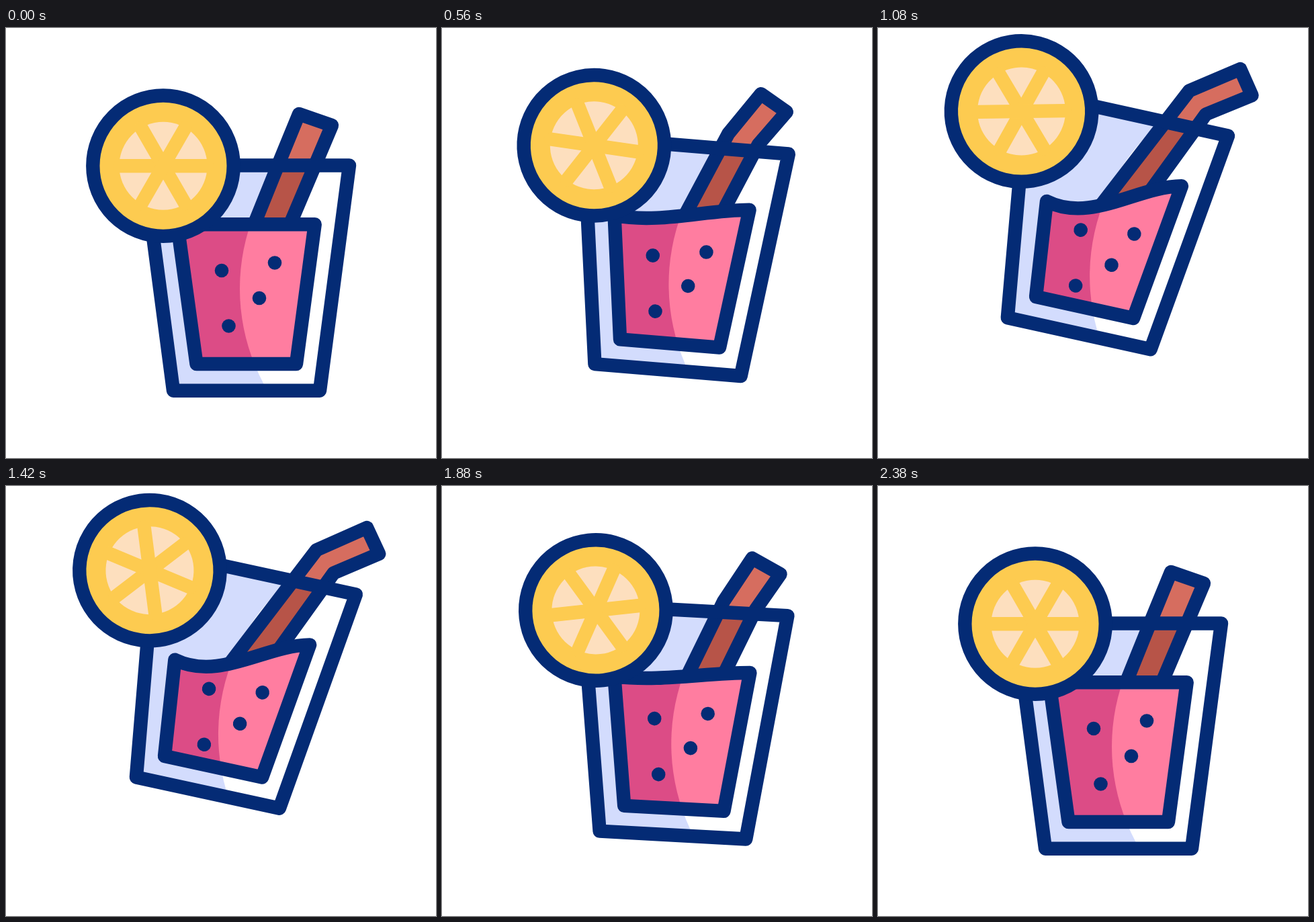
An HTML page with a canvas that plays this animation: 640x640 px, repeating every 2400 ms.

```html
<!DOCTYPE html>
<html lang="en">
<head>
<meta charset="utf-8">
<title>Swaying drink</title>
<style>
  html, body { margin: 0; height: 100%; overflow: hidden; background: #fff; }
  canvas { display: block; }
</style>
</head>
<body>
<canvas id="stage" width="640" height="640"></canvas>
<script>
const ctx = document.getElementById('stage').getContext('2d');
const NAVY = '#042b75', LINE = 20.4, LOOP = 2400, PEAK = 1200, END = 2380;

// Cubic bezier easing (0.76, 0, 0.24, 1), solved by bisection.
function ease(x) {
  if (x <= 0) return 0;
  if (x >= 1) return 1;
  let low = 0, high = 1;
  for (let i = 0; i < 30; i++) {
    const s = (low + high) / 2;
    if (2.28 * s - 3.84 * s * s + 2.56 * s ** 3 < x) low = s; else high = s;
  }
  return low * low * (3 - 2 * low);
}

function polygon(points) {
  const path = new Path2D();
  points.forEach(([x, y]) => path.lineTo(x, y));
  path.closePath();
  return path;
}

function disc(x, y, r) {
  const path = new Path2D();
  path.arc(x, y, r, 0, 2 * Math.PI);
  return path;
}

function fill(path, color) {
  ctx.fillStyle = color;
  ctx.fill(path);
}

function outline(path, color = NAVY) {
  ctx.strokeStyle = color;
  ctx.stroke(path);
}

// Fills a shape, then paints the overlap with a second shape.
function fillOverlap(shape, color, overlap, overlapColor) {
  fill(shape, color);
  ctx.save();
  ctx.clip(shape);
  fill(overlap, overlapColor);
  ctx.restore();
}

const glass = polygon([[205, 204.5], [511, 204.5], [467, 539.7], [249, 539.7]]);
const shine = disc(648, 388, 300);
const bubbles = [[321, 361], [400, 349.5], [377, 402], [331.5, 443.5]];

function drawDrink(p) {
  const angle = 12.55 * Math.PI / 180 * p;
  const at = (x, y, dx, dy) => [x + dx * p, y + dy * p];

  ctx.save();
  ctx.translate(320 - 10.5 * p, 320 - 88.5 * p);
  ctx.rotate(angle);
  ctx.translate(-320, -320);

  fillOverlap(glass, '#d3dcfd', shine, '#fff');

  const straw = polygon([
    [342, 360], at(406.5, 200, 34, -49), at(436, 128, 71.7, -24.7),
    at(485, 145, 48, -7), at(460.5, 203, 11.5, -23), [394, 360]
  ]);
  fill(straw, '#d66d5f');
  ctx.save();
  ctx.clip(glass);
  fill(straw, '#b75448');
  ctx.restore();
  outline(straw);

  const liquid = new Path2D();
  liquid.moveTo(...at(255, 292.3, 13.5, 66));
  liquid.bezierCurveTo(...at(323, 292.3, 17.5, 84), ...at(392, 292.3, 3, 15), 459.7, 292.3);
  liquid.lineTo(432, 500);
  liquid.lineTo(283.5, 500);
  liquid.closePath();
  fillOverlap(liquid, '#dc4c86', shine, '#ff7da0');
  outline(liquid);

  // Bubbles sink straight down the stage while the glass tilts.
  const sink = 28.5 * p;
  for (const [x, y] of bubbles)
    fill(disc(x + sink * Math.sin(angle), y + sink * Math.cos(angle), 10.3), NAVY);

  outline(glass);
  ctx.restore();
}

function drawLemon(p, spin) {
  ctx.save();
  ctx.translate(234 - 20.6 * p, 205.2 - 81.7 * p);
  ctx.rotate(spin);
  const rind = disc(0, 0, 104.7);
  fill(rind, '#fdcb50');
  fill(disc(0, 0, 65.5), '#fddfbe');
  for (let i = 0; i < 3; i++) {
    outline(polygon([[-65, 0], [65, 0]]), '#fdcb50');
    ctx.rotate(Math.PI / 3);
  }
  outline(rind);
  ctx.restore();
}

function frame(now) {
  const t = now % LOOP;
  const sway = t < PEAK ? ease(t / PEAK) : 1 - ease((t - PEAK) / (END - PEAK));
  ctx.fillStyle = '#fff';
  ctx.fillRect(0, 0, 640, 640);
  ctx.lineWidth = LINE;
  ctx.lineJoin = 'round';
  drawDrink(sway);
  drawLemon(sway, Math.PI * ease(t / END));
  requestAnimationFrame(frame);
}
requestAnimationFrame(frame);
</script>
</body>
</html>
```
